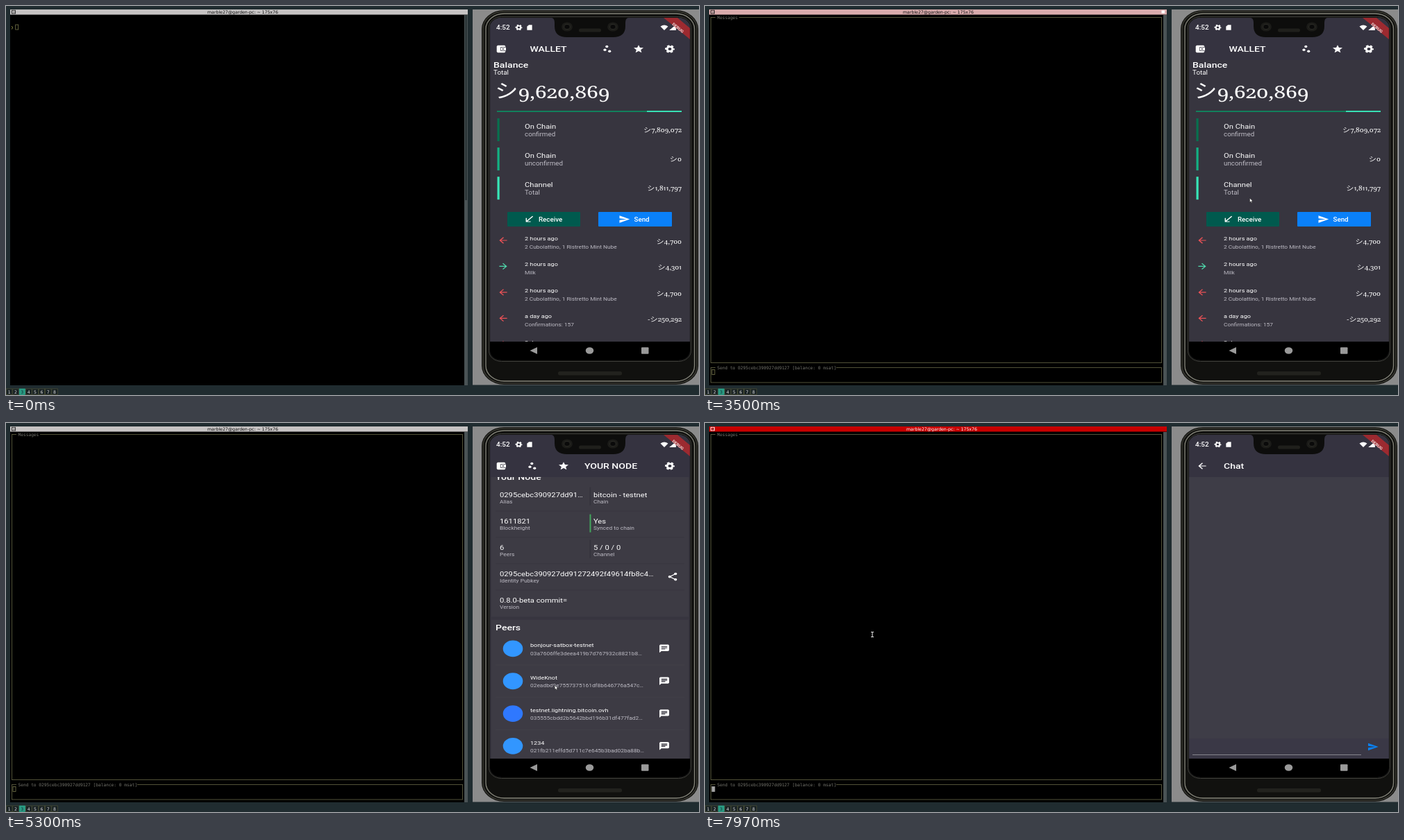
An HTML page for the animation above (8000 ms loop, 998x561 px).

```html
<!DOCTYPE html>
<html lang="en">
<head>
<meta charset="utf-8">
<title>Terminal and wallet</title>
<style>
html, body { margin: 0; width: 100%; height: 100%; overflow: hidden; background: #202c30; }
svg { display: block; }
text { white-space: pre; }
.phone { font-family: Roboto, sans-serif; }
.kana { font-family: "Noto Sans CJK JP", "Noto Sans CJK", sans-serif; }
.num { font-family: "Noto Serif", serif; font-size: .91em; font-variant-numeric: oldstyle-nums proportional-nums; }
.mono { font: 6.2px "DejaVu Sans Mono", monospace; fill: #74746c; }
.ui { font: 6.2px "DejaVu Sans", sans-serif; }
.mid { text-anchor: middle; }
.end { text-anchor: end; }
.bold { font-weight: 500; }
</style>
</head>
<body>
<svg id="stage" width="998" height="561" viewBox="0 0 998 561"></svg>
<script>
const LOOP = 8000, WIDE = 1.2, PAGE = 288;
const SOFT = '#bdbbc4', PAPER = '#37353f', CARD = '#3d3b44', BAR = '#353340';

// Building blocks; everything on the phone is 1.2 times wider than tall
const rect = (x, y, w, h, fill, more = '') =>
  `<rect x="${x}" y="${y}" width="${w}" height="${h}" fill="${fill}" ${more}/>`;
const oval = (x, y, r, fill, more = '') =>
  `<ellipse cx="${x}" cy="${y}" rx="${r * WIDE}" ry="${r}" fill="${fill}" ${more}/>`;
const label = (x, y, text, size, fill = '#fff', cls = '') =>
  `<text transform="translate(${x} ${y}) scale(${WIDE} 1)" font-size="${size}" fill="${fill}" class="${cls}">${text}</text>`;
const coins = (amount, sign = '') =>
  `<tspan class="num">${sign}</tspan><tspan class="kana">シ</tspan><tspan class="num">${amount}</tspan>`;
const path = d => `<path fill-rule="evenodd" d="${d}"/>`;
const dot = (x, y, r) => `<circle cx="${x}" cy="${y}" r="${r}"/>`;

const ICONS = {
  wallet: path('M5 3h14l2 2v2H11v10h10v2l-2 2H5l-2-2V5zM12 8h10v8H12zM17.5 12a1.5 1.5 0 1 0-3 0a1.5 1.5 0 1 0 3 0z'),
  channels: dot(7, 14, 3) + dot(11, 6, 3) + dot(16.6, 17.6, 3),
  star: path('M12 17.3 18.2 21l-1.7-7L22 9.2l-7.2-.6L12 2 9.2 8.6 2 9.2 7.5 14 5.8 21z'),
  gear: '<g fill="none" stroke="currentColor"><circle cx="12" cy="12" r="5.6" stroke-width="4.2"/>' +
    '<circle cx="12" cy="12" r="8.4" stroke-width="3" stroke-dasharray="4.8 4" stroke-dashoffset="2.4"/></g>',
  send: path('M2 21 23 12 2 3v7l15 2-15 2z'),
  back: path('M20 11H7.8l5.6-5.6L12 4l-8 8 8 8 1.4-1.4L7.8 13H20z'),
  forward: path('M4 11h12.2l-5.6-5.6L12 4l8 8-8 8-1.4-1.4 5.6-5.6H4z'),
  receive: path('M20 5.4 18.6 4 7 15.6V9H5v10h10v-2H8.4z'),
  check: path('M9 16.2 4.8 12l-1.4 1.4L9 19 21 7l-1.4-1.4z'),
  share: dot(18, 5, 3) + dot(6, 12, 3) + dot(18, 19, 3) +
    '<path d="M18 5 6 12l12 7" fill="none" stroke="currentColor" stroke-width="2"/>',
  chat: path('M4 2h16l2 2v12l-2 2H6l-4 4V4zM6 6h12v2H6zM6 9h12v2H6zM6 12h8v2H6z'),
  card: path('M18 2h-8L4 8v14h16V2z'),
  wifi: path('M.5 8Q12-1 23.5 8L12 22z'),
  signal: path('M2 22h20V2z'),
  battery: path('M8 2h8v2h2v18H6V4h2z')
};
const icon = (name, x, y, fill = '#fff', scale = .584) =>
  `<g transform="translate(${x} ${y}) scale(${scale * WIDE} ${scale}) translate(-12 -12)" fill="${fill}" color="${fill}">${ICONS[name]}</g>`;

// Desktop and terminal
function desktop() {
  const spaces = [1, 2, 3, 4, 5, 6, 7, 8].map((n, i) => {
    const x = i * 9.35, on = n === 3;
    return rect(x + .5, 552, 8.4, 8.5, on ? '#2a9d84' : '#182124', `stroke="${on ? '#2a9d84' : '#4d5137'}" stroke-width=".7"`) +
      `<text x="${x + 4.6}" y="558.6" class="ui mid" fill="${on ? '#123' : '#ddd'}">${n}</text>`;
  }).join('');
  return rect(0, 0, 998, 561, '#202c30') + spaces + rect(6, 5, 659, 542, '#000') +
    rect(660, 13, 5, 534, '#4a5355') + rect(661, 13, 3, 267, '#2c3638', 'id="trough"') +
    rect(6, 5, 659, 7.5, '#c6c3c3', 'id="title"') +
    rect(8.5, 6.3, 5, 4.6, 'none', 'id="mark" stroke="#222" stroke-width=".9"') + rect(10.5, 8, 2, 1.5, '#777') +
    '<text id="caption" y="11" class="ui mid">marble27@garden-pc: ~ 175x76</text>' +
    rect(657.5, 6.5, 4.5, 4, '#fff', 'id="bell"');
}
const frame = (y, h, title, width) =>
  rect(8.5, y, 649, h, 'none', 'stroke="#5b5b3e" stroke-width=".9"') +
  rect(15, y - 3, width, 6, '#000') + `<text x="17.5" y="${y + 2.1}" class="mono">${title}</text>`;
const terminal = () =>
  '<g id="shell"><text x="7" y="32.5" class="mono" style="fill:#8f8f48">❯</text></g>' +
  '<g id="tui">' + frame(16.5, 498, 'Messages', 34) +
  frame(521.5, 21.5, 'Send to 0295cebc390927dd9127 [balance: 0 msat]', 174) + '</g>' +
  rect(0, 0, 4, 7, 'none', 'id="caret" stroke-width=".8"');

// Phone pages
function wallet() {
  const accounts = [['On Chain', 'confirmed', '7,809,072', '#08704f'],
    ['On Chain', 'unconfirmed', '0', '#13b183'], ['Channel', 'Total', '1,811,797', '#38e6b8']];
  const order = '2 Cubolattino, 1 Ristretto Mint Nube';
  const history = [['2 hours ago', order, '4,700'], ['2 hours ago', 'Milk', '4,301', 1],
    ['2 hours ago', order, '4,700'], ['a day ago', 'Confirmations: 157', '250,292', 0, '-'], ['2 days ago', '', '']];
  return label(702, 89.3, 'Balance', 11.7, '#fff', 'bold') + label(702, 99.4, 'Total', 8.2) +
    label(704, 133, coins('9,620,869'), 28) +
    rect(707, 151, 217, 2, '#12805c') + rect(923, 151, 50, 2, '#38e0b4') +
    accounts.map(([name, kind, sum, color], i) => {
      const y = 162 + i * 42.1;
      return rect(707.5, y, 3.2, 33, color) + label(747, y + 14.5, name, 9.35) +
        label(747, y + 26, kind, 8.17, SOFT) + label(973, y + 19.8, coins(sum), 9.35, '#fff', 'end');
    }).join('') +
    rect(722, 297, 105, 21, '#005a4e', 'rx="1"') + icon('receive', 753.5, 307.5) + label(767, 310.5, 'Receive', 8.17, '#fff', 'bold') +
    rect(853, 297, 106, 21, '#0a80f8', 'rx="1"') + icon('send', 890.5, 307.5) + label(904.5, 310.5, 'Send', 8.17, '#fff', 'bold') +
    history.map(([when, note, sum, incoming, sign], i) => {
      const y = 335 + i * 37.45;
      return label(747, y + 3, when, 7.6) + label(747, y + 14.6, note, 7, SOFT) +
        icon(incoming ? 'forward' : 'back', 716, y + 3, incoming ? '#4fdcae' : '#ee5257') +
        (sum && label(973, y + 8, coins(sum, sign), 9.35, '#fff', 'end'));
    }).join('');
}

function channels() {
  const rows = [['1772044407591075841', '154,122', '95,695'], ['1769912454538461184', '249,817', '0'],
    ['1741666000820436993', '917,446', '82,370'], ['1767491329931280385', '490,412', '9,404'],
    ['1772090587073019904', '0', '99,817']];
  const value = s => +s.replace(',', '');
  return rows.map(([id, local, remote], i) => {
    const y = 92 + i * 33.95, share = value(local) / (value(local) + value(remote));
    return oval(716, y + 2.3, 6.2, '#4caf50') + icon('check', 716, y + 2.3, '#2f3a35', .38) +
      label(747, y - 4.6, 'ID', 7, SOFT) + label(758, y - 4.6, id, 7.6) +
      rect(747, y - .8, 226, 1.6, '#d2ac38') + rect(747, y - .8, 226 * share, 1.6, '#43a64d') +
      label(747, y + 11.3, 'Local', 7, SOFT) + label(774, y + 12.2, coins(local), 9.35) +
      label(973, y + 12.2, `<tspan font-size="7" fill="${SOFT}">Remote</tspan><tspan dx="4"> </tspan>${coins(remote)}`, 9.35, '#fff', 'end');
  }).join('');
}

function node() {
  const facts = [[0, 0, '0295cebc390927dd91…', 'Alias'], [1, 0, 'bitcoin - testnet', 'Chain'],
    [0, 1, '1611821', 'Blockheight'], [1, 1, 'Yes', 'Synced to chain'],
    [0, 2, '6', 'Peers'], [1, 2, '5 / 0 / 0', 'Channel'],
    [0, 3, '0295cebc390927dd91272492f49614fb8c4…', 'Identity Pubkey'], [0, 4, '0.8.0-beta commit=', 'Version']];
  const peers = [['bonjour-satbox-testnet', '03a7606ffe3deea419b7d767932c8821b8', '#3296ff'],
    ['WideKnot', '02eadbd9e7557375161df8b646776a547c', '#3296ff'],
    ['testnet.lightning.bitcoin.ovh', '035555cbdd2b5642bbd196b31df477fad2', '#2f78ff'],
    ['1234', '021fb211effd5d711c7e645b3bad02ba88b', '#3296ff'],
    ['CalmHarborVioletMeadow', '03fe8b515eb339544c6ba2fe49f605c9353', '#ff9a05'],
    ['DOLVENT-RAINSTORM-1', '02fab76b55ef4355cb71413d32b0de7f867', '#32a6ff']];
  return rect(699, 80, 284, 214, CARD) + rect(699, 298, 284, 310, CARD) +
    label(705, 96.2, 'Your Node', 11.7, '#fff', 'bold') +
    facts.map(([col, row, value, name]) => {
      const x = 711 + col * 135, y = 121.4 + row * 38;
      return label(x, y, value, 9.35) + label(x, y + 9, name, 7, SOFT);
    }).join('') +
    [141, 179, 217, 255].map(y => rect(705, y, 272, .6, '#35333c')).join('') +
    [107, 183].map(y => rect(840.5, y, 1.6, 26, '#35333c')).join('') + rect(840.5, 146, 2, 26, '#43a65c') +
    icon('share', 960, 236) + label(705, 313.7, 'Peers', 11.7, '#fff', 'bold') +
    peers.map(([name, key, color], i) => {
      const y = 339.8 + i * 46.8;
      return oval(730, y, 11.9, color) + label(755, y - 2.3, name, 7.6) + label(755, y + 9.2, key + '…', 7, SOFT) +
        icon('chat', 948, y) + rect(705, y + 23.2, 272, .6, '#45434a');
    }).join('');
}

const chat = () => rect(697, 17, PAGE, 467, '#3e3d47') + rect(697, 17, PAGE, 61, BAR) +
  icon('back', 716, 62) + label(747, 66.2, 'Chat', 11.7, '#fff', 'bold') +
  rect(697, 455, PAGE, 29, '#3a3846') + rect(702, 478, 243, 1, '#85848c') + icon('send', 962, 467, '#0a80f0');

const TABS = [['wallet', 'WALLET'], ['channels', 'CHANNELS'], ['star', 'YOUR NODE'], ['gear', '']];
const header = () => rect(697, 17, PAGE, 61, BAR) + TABS.map(([name, title], i) =>
  `<svg id="title${i}" y="48" height="28">${label(0, 18.2, title, 11.7, '#fff', 'bold mid')}</svg>` +
  `<g id="tab${i}">${icon(name, 0, 62)}</g>`).join('');

function phone() {
  const outline = (x, y, w, h, r, color, width) =>
    rect(x, y, w, h, 'none', `rx="${r * WIDE}" ry="${r}" stroke="${color}" stroke-width="${width}"`);
  const camera = x => oval(x, 30, 6.6, '#1c1c19') + oval(x, 30, 3.5, '#0a0a0a', 'stroke="#33332c" stroke-width=".8"');
  return rect(672, 5, 326, 541.5, '#8b8b8b') + rect(685, 6, 312, 540, '#11110f', 'rx="32" ry="27"') +
    outline(687, 8, 308, 536, 25, '#3b3b33', 1.4) + outline(691, 11, 300.5, 530, 22, '#85857a', 1.3) +
    outline(695.5, 15.5, 291, 497, 15, '#3e3e3a', 1) +
    '<clipPath id="screen"><rect x="697" y="17" width="288" height="494" rx="17" ry="14"/></clipPath>' +
    '<clipPath id="body"><rect x="697" y="78" width="288" height="406"/></clipPath>' +
    '<g class="phone" clip-path="url(#screen)">' + rect(697, 17, PAGE, 494, PAPER) +
    `<g clip-path="url(#body)">${[wallet, channels, node].map((page, i) => `<g id="page${i}">${page()}</g>`).join('')}</g>` +
    header() +
    `<g id="fab">${oval(0, 0, 13.8, '#5bdcc0')}<path d="M-4.2 0h8.4M0-3.5v7" stroke="#16302c" stroke-width="1.3"/></g>` +
    `<g id="chat">${chat()}</g>` +
    label(706, 34, '4:52', 8.3, '#fff', 'bold') + icon('gear', 738.5, 31, '#fff', .42) + icon('card', 754, 31, '#fff', .38) +
    icon('wifi', 948, 31, '#fff', .4) + icon('signal', 960, 31, '#fff', .4) + icon('battery', 971, 31, '#fff', .4) +
    '<path d="M947 17h20l18 15v16z" fill="#9c2a30"/>' +
    '<text transform="translate(966.5 33) rotate(40) scale(1.1 1)" font-size="5.6" font-weight="700" fill="#f2dede" class="mid">DEBUG</text>' +
    '<path d="M786 17q4 1 4 7v5q0 16 18 16h66q18 0 18-16v-5q0-6 4-7z" fill="#0d0d0c"/>' + camera(808) + camera(874) +
    rect(825, 32.5, 32, 5, '#20201c', 'rx="2.5"') +
    rect(697, 484, PAGE, 27, '#000') + '<path d="M765 492v10l-10.500-5z" fill="#9a9a9a"/>' +
    oval(840.5, 497, 4.8, '#9a9a9a') + rect(915, 492.3, 10.5, 9.5, '#9a9a9a', 'rx="1"') + '</g>' +
    rect(795, 527, 92, 5.5, '#22221e', 'rx="2.5"');
}

const stage = document.getElementById('stage');
stage.innerHTML = desktop() + terminal() + phone() +
  '<path id="arrow" d="M0 0v6.200l1.500-1.400 1 2.200 1.100-.5-1-2.100h2z" fill="#fff" stroke="#111" stroke-width=".5"/>' +
  '<path id="beam" d="M-2-3.500h4M-2 3.500h4M0-3.500v7" stroke="#ddd" stroke-width="1.100"/>';
const parts = Object.fromEntries([...stage.querySelectorAll('[id]')].map(e => [e.id, e]));
const put = (id, attrs) => { for (const k in attrs) parts[id].setAttribute(k, attrs[k]); };
const show = (id, on) => { parts[id].style.display = on ? '' : 'none'; };
const move = (id, x, y, scale = 1) => put(id, { transform: `translate(${x} ${y}) scale(${scale})` });

// Motion tables: time in ms, then values
const POINTER = [[350, 1010, 400], [700, 660, 320], [1000, 458, 287], [2800, 458, 287], [3160, 667, 284],
  [3500, 784, 277], [3850, 940, 271], [3920, 940, 271], [4120, 850, 267], [4230, 867, 267], [4500, 930, 278],
  [4580, 930, 279], [4780, 758, 282], [4950, 758, 282], [5200, 790, 400], [5260, 790, 398], [5500, 792, 283],
  [5800, 792, 283], [6250, 948, 269], [6750, 948, 269], [7250, 925, 285], [7540, 663, 295], [7820, 241, 305]];
const SWIPE = [[3930, 0], [4080, .28], [4160, .62], [4230, .833], [4320, .95], [4450, 1], [4590, 1], [4700, 1.38],
  [4780, 1.7], [4830, 1.833], [4910, 1.95], [5000, 2]];
const SCROLL = [[5260, 0], [5340, 28], [5480, 88], [5600, 109], [5720, 115]];
const FAB = [[3950, 0], [4150, 1], [4650, 1], [4830, .25], [4880, 0]];
const CHAT = [[6330, 0], [6400, .4], [6480, .8], [6560, .95], [6640, 1]];

function at(table, t) {
  if (t <= table[0][0]) return table[0].slice(1);
  const i = table.findIndex(row => row[0] > t);
  if (i < 0) return table[table.length - 1].slice(1);
  const a = table[i - 1], b = table[i], k = (t - a[0]) / (b[0] - a[0]);
  return a.slice(1).map((v, n) => v + (b[n + 1] - v) * k);
}

function draw(t) {
  const [x, y] = at(POINTER, t), [pos] = at(SWIPE, t), [scroll] = at(SCROLL, t);
  const [fab] = at(FAB, t), [fade] = at(CHAT, t);
  const focus = x < 665, blurring = !focus && t > 3100 && t < 3700, tui = t >= 2650;

  put('title', { fill: focus ? '#c80000' : blurring ? '#d9abac' : '#c6c3c3' });
  put('caption', { x: blurring ? 336 : 341, fill: focus ? '#fff' : '#111' });
  put('mark', { stroke: focus ? '#fff' : '#222' });
  show('bell', blurring);
  show('trough', !tui);
  show('shell', !tui);
  show('tui', tui);
  put('caret', { x: tui ? 10 : 13.7, y: tui ? 524.5 : 27, fill: focus ? '#a5a5a5' : 'none', stroke: focus ? '#a5a5a5' : '#77774c' });
  show('caret', !focus || t % 1200 > 600);

  let tabX = 713;
  TABS.forEach((_, i) => {
    const open = Math.max(0, 1 - Math.abs(pos - i));
    move('tab' + i, tabX, 0);
    put('title' + i, { x: tabX + 7, width: 10 + 108 * open, opacity: open });
    put('title' + i, {});
    parts['title' + i].firstChild.setAttribute('transform', `translate(${7 + 54 * open} 18.2) scale(${WIDE} 1)`);
    tabX += 45 + 108 * open;
  });
  for (let i = 0; i < 3; i++) {
    move('page' + i, PAGE * (i - pos), i === 2 ? -scroll : 0);
    show('page' + i, Math.abs(i - pos) < 1);
  }
  move('fab', 954, 457.5, fab);
  put('fab', { opacity: Math.min(1, fab * 1.3) });
  move('chat', 0, (1 - fade) * 117);
  put('chat', { opacity: fade });

  move('arrow', x, y);
  move('beam', x, y);
  show('arrow', !focus);
  show('beam', focus);
}

const start = performance.now();
function tick() {
  draw((performance.now() - start) % LOOP);
  requestAnimationFrame(tick);
}
tick();
</script>
</body>
</html>
```
